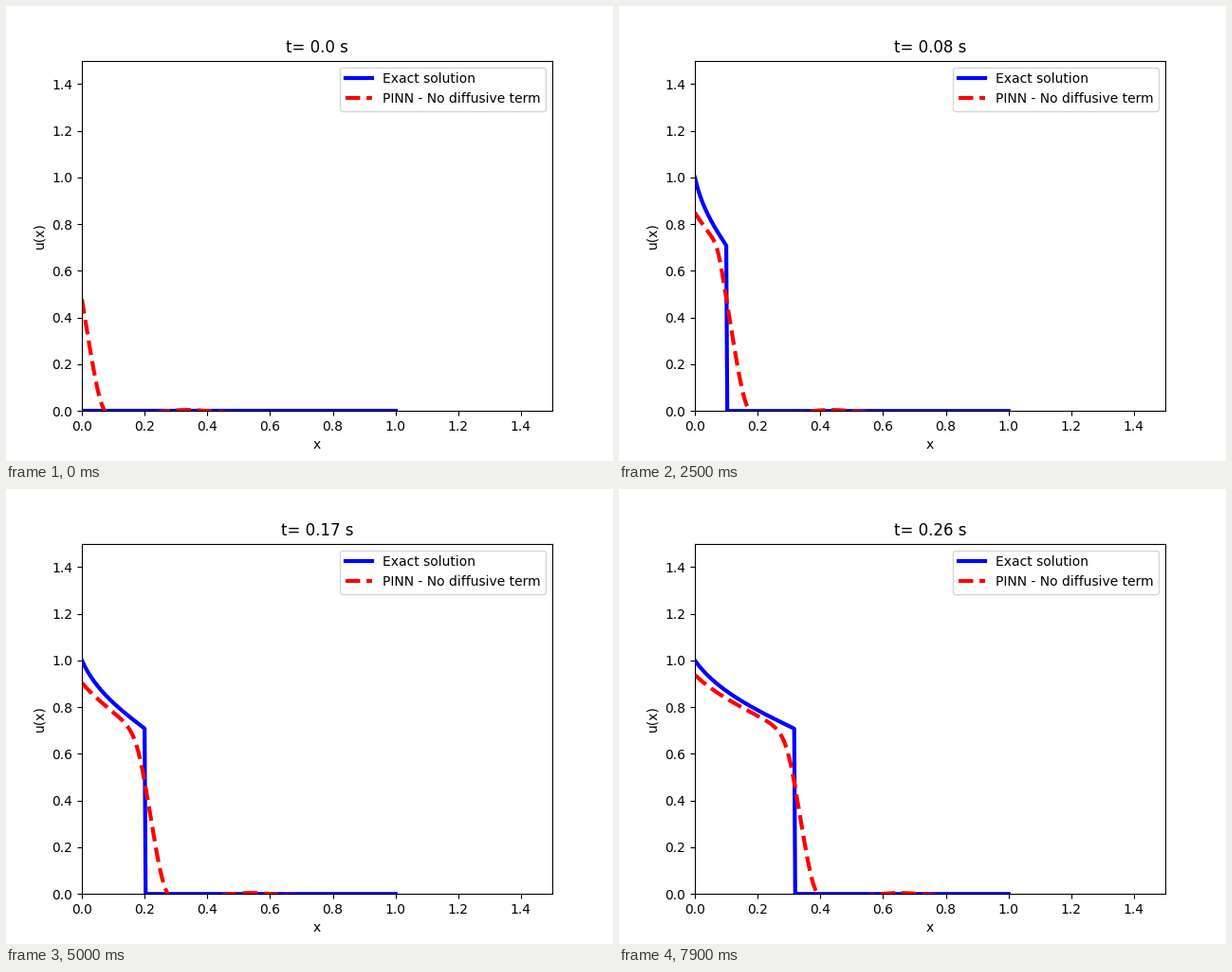
Write a matplotlib script that moves like this. It is 640 px wide and 480 px high and loops after 8000 ms.

```python
import numpy as np
import matplotlib.pyplot as plt
from matplotlib.animation import FuncAnimation

FRAMES, INTERVAL = 80, 100
DT = 1 / 300
SHOCK = (1 + np.sqrt(2)) / 2      # front speed of the exact solution

x = np.linspace(0, 1, 301)


def wave_speed(u):
    """Derivative of the flux u^2 / (u^2 + (1 - u)^2)."""
    return 2 * u * (1 - u) / (u**2 + (1 - u)**2)**2


STATES = np.linspace(1, 0.6, 400)
SPEEDS = wave_speed(STATES)


def rarefaction(v):
    return np.interp(v, SPEEDS, STATES)


def exact(t):
    if t == 0:
        return np.zeros_like(x)
    return np.where(x <= SHOCK * t, rarefaction(x / t), 0)


def front(d):
    """Steep ramp with a rounded foot and a faint ripple ahead of it."""
    width = 0.012
    ramp = 8.4 * width * np.logaddexp(0, (0.0605 - d) / width)
    dip = 0.022 * np.exp(-(d / 0.2)**4)
    bump = 0.0125 * np.exp(-((d - 0.335) / 0.1)**2)
    return ramp - 0.0083 - dip + bump


def network(t):
    """Smooth minimum of a travelling front and a shifted rarefaction."""
    ahead = front(x - SHOCK * t)
    shift = 0.051 - 0.14 * t**2
    delay = 0.026 - 0.2 * t**2
    behind = rarefaction((x + shift) / (t + delay))
    p = 6 + 14 / (1 + (t / 0.095)**6)     # sharpness of the knee
    ratio = np.maximum(ahead, 0) / behind
    return ahead * (1 + ratio**p)**(-1 / p)


fig, ax = plt.subplots(figsize=(6.4, 4.8), dpi=100)
exact_line, = ax.plot(x, exact(0), "b-", lw=3, label="Exact solution")
net_line, = ax.plot(x, network(0), "r--", lw=3,
                    label="PINN - No diffusive term")
ax.set(xlim=(0, 1.5), ylim=(0, 1.5), xlabel="x", ylabel="u(x)")
ax.set_xticks(np.arange(0, 1.5, 0.2))
ax.set_yticks(np.arange(0, 1.5, 0.2))
ax.legend(loc="upper right")
title = ax.set_title("t= 0.0 s")


def update(i):
    t = i * DT
    exact_line.set_ydata(exact(t))
    net_line.set_ydata(network(t))
    title.set_text(f"t= {round(t, 2)} s")
    return exact_line, net_line, title


anim = FuncAnimation(fig, update, frames=FRAMES, interval=INTERVAL,
                     repeat=True, repeat_delay=0)
plt.show()
```
